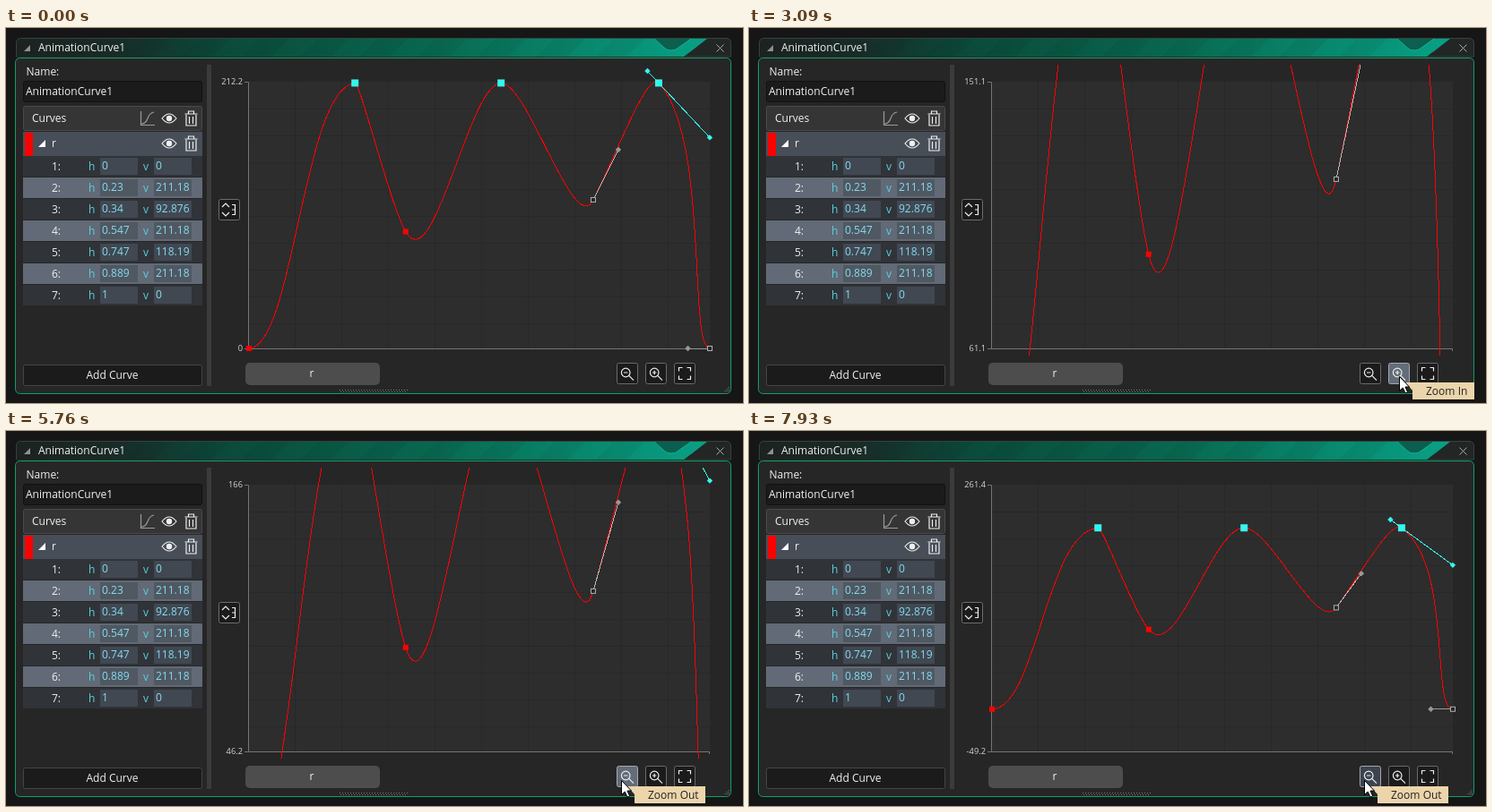
These frames come from a looping animation (822 px wide and 419 px high, 8000 ms). An HTML page:

```html
<!DOCTYPE html>
<html lang="en">
<head>
<meta charset="utf-8">
<title>Curve editor</title>
<style>
html, body { margin: 0; width: 100%; height: 100%; overflow: hidden; background: #161616; }
svg { display: block; width: 822px; height: 419px; font: 12px "Open Sans", "Noto Sans", sans-serif; }
text { fill: #f0f0f0; white-space: pre; }
.axis { font-size: 9.3px; fill: #d6d6d6; text-anchor: end; }
.mid { text-anchor: middle; }
.key { fill: #5ccfdc; }
.val { fill: #83dcf0; }
.icon { fill: none; stroke: #eee; stroke-width: 1.2; }
.tip text { fill: #222; }
</style>
</head>
<body>
<svg viewBox="0 0 822 419" xmlns="http://www.w3.org/2000/svg">
  <defs>
    <linearGradient id="bar">
      <stop offset="0" stop-color="#1c2221"/>
      <stop offset=".14" stop-color="#182b27"/>
      <stop offset=".3" stop-color="#0b4a3b"/>
      <stop offset=".6" stop-color="#08684f"/>
      <stop offset=".8" stop-color="#08856a"/>
      <stop offset="1" stop-color="#08a186"/>
    </linearGradient>
    <clipPath id="view"><rect x="264" y="41" width="526" height="325"/></clipPath>
  </defs>
  <g id="frame"></g>
  <g id="side"></g>
  <g id="plot"></g>
  <g clip-path="url(#view)" id="graph"></g>
  <text class="axis" id="top" x="264" y="63"></text>
  <text class="axis" id="bottom" x="264" y="361"></text>
  <g id="tools"></g>
  <g id="tips"></g>
  <path id="cursor" d="M.5 .5V16.5L4.2 13L7 19L9.6 17.8L7 12H11.5Z" fill="#fff" stroke="#000"/>
</svg>
<script>
const LOOP = 8000;
const $ = id => document.getElementById(id);
const rect = (x, y, w, h, fill, stroke = 'none', r = 0) =>
  `<rect x="${x}" y="${y}" width="${w}" height="${h}" rx="${r}" fill="${fill}" stroke="${stroke}"/>`;
const label = (x, y, str, cls = '') => `<text x="${x}" y="${y}" class="${cls}">${str}</text>`;
const path = (d, fill = 'none', stroke = 'none') => `<path d="${d}" fill="${fill}" stroke="${stroke}"/>`;
const icon = (x, y, d, stroke = '#eee') =>
  `<path class="icon" style="stroke:${stroke}" transform="translate(${x} ${y})" d="${d}"/>`;

// Each key: position, value, tangent slope on screen, handle reach to the left and right.
const keys = [
  [0, 0, 0, 0, 50],
  [.23, 211.18, -.1, 58, 6],
  [.34, 92.876, 1.7, 17, 32],
  [.547, 211.18, 0, 36, 30],
  [.747, 118.19, -2, 21.5, 28],
  [.889, 211.18, 1.07, 12.5, 57],
  [1, 0, 0, 24.5, 0]
];
const PLOT = { x: 271, y: 60, w: 514, h: 298 };
const HALF = 106.1;

function drawFrame() {
  let slants = '';
  for (let x = 130; x < 700; x += 66) slants += `M${x + 20} 12H${x + 54}L${x + 34} 32H${x}Z`;
  $('frame').innerHTML =
    path('M11.5 32V17Q11.5 11.5 17 11.5H803Q808.5 11.5 808.5 17V32Z', '#222625', '#35433f') +
    path('M12 32V17Q12 12 17 12H782L756 32Z', 'url(#bar)') + path(slants, 'rgba(0,25,18,.06)') +
    path('M723 12L734 22Q737 25 742 25Q747 25 750 22L764 12', '#0b5f4f', '#10b294') +
    path('M20 26H27V19Z', '#909090') +
    label(36, 26, 'AnimationCurve1') +
    path('M792.5 18.5L800.5 26.5M800.5 18.5L792.5 26.5', 'none', '#a9a9a9') +
    rect(10.5, 33.5, 798, 375, '#262626', '#0f9f68', 5) +
    `<path d="M372 404.5H448M373 406.5H448" stroke="#777" stroke-dasharray="1 2"/>` +
    `<path d="M806 401V407M804 403V407M802 405V407" stroke="#777" stroke-dasharray="1 1"/>`;
}

const EYE = 'M-8 0Q0-10 8 0Q0 10-8 0Z';
const TRASH = 'M-7-5H7M-3-5V-8H3V-5M-5.5-4V8H5.5V-4M-2-2V6M2-2V6';
const eyeAndTrash = y => icon(182, y, EYE) +
  `<circle cx="182" cy="${y}" r="3.2" fill="#eee"/>` + icon(206.5, y, TRASH);

function drawSide() {
  let out = label(22.5, 53, 'Name:') +
    rect(19.5, 59.5, 199, 23, '#1b1b1b', '#111', 2) + label(22, 75, 'AnimationCurve1') +
    rect(19.5, 87.5, 199, 27, '#353535', '#4a4a4a', 2) + label(29, 105, 'Curves') +
    icon(158, 101, 'M-7.5-8V7.5H8M-7 6Q-2 6 0 0T7-7', '#9a9a9a') + eyeAndTrash(101) +
    rect(19, 116, 200, 27, '#484e58') + rect(21, 117, 9, 26, '#f00') +
    path('M36 133H44V125Z', '#fff') + label(51, 133, 'r') + eyeAndTrash(129);
  keys.forEach(([h, v], i) => {
    const y = 143 + 24 * i, lit = i % 2, cell = lit ? '#505862' : '#414852';
    out += rect(19, y, 200, 23, lit ? '#616a76' : '#303338') +
      rect(105, y + 2, 42, 19, cell) + rect(165, y + 2, 42, 19, cell) +
      label(51, y + 16, i + 1 + ':') +
      label(92, y + 16, 'h', 'key') + label(107, y + 15, h, 'val') +
      label(153, y + 16, 'v', 'key') + label(167, y + 15, v, 'val');
  });
  out += rect(19.5, 376.5, 199, 23, '#1b1b1b', '#454545', 2) + label(118.5, 392, 'Add Curve', 'mid') +
    rect(224, 41, 5, 359, '#3b3b3b') +
    rect(237.5, 191.5, 23, 23, '#1b1b1b', '#6d6d6d', 2) +
    icon(249, 203, 'M-8-3L-4-7L0-3M-8 3L-4 7L0 3M3-5.5H6.5V5.5H3M3 0H6.5');
  $('side').innerHTML = out;
}

function drawPlot() {
  const { x, y, w, h } = PLOT;
  let lines = '';
  for (let i = 1; i < 10; i++) {
    lines += `M${x - .5 + 52 * i} ${y}v${h}M${x} ${y + .5 + 30 * i}h${w}`;
  }
  $('plot').innerHTML = rect(x, y, w, h, '#2d2d2d') + path(lines, 'none', '#282828') +
    path('M266 60.5H270.5V358.5H785M266 358.5H270.5M784.5 358V361', 'none', '#757575') +
    rect(267, 374, 150, 25, '#4d4d4d', 'none', 5) + label(341, 390, 'r', 'mid');
}

function drawGraph(scale) {
  const toY = v => PLOT.y + PLOT.h / 2 - (v - HALF) / HALF * PLOT.h / 2 * scale;
  const pts = keys.map(([h, v, slope, left, right]) => {
    const x = PLOT.x + h * PLOT.w, y = toY(v);
    const handle = dx => [x + dx, y + slope * dx * scale];
    return { at: [x, y], left: handle(-left), right: handle(right) };
  });
  const line = (a, b, color) =>
    `<path d="M${a}L${b}" stroke="${color}" shape-rendering="crispEdges"/>`;
  const square = (p, r, fill, stroke) =>
    rect(p.at[0] - r, p.at[1] - r, 2 * r, 2 * r, fill, stroke);
  const diamond = ([x, y], color) =>
    path(`M${x - 3.2} ${y}L${x} ${y - 3.2}L${x + 3.2} ${y}L${x} ${y + 3.2}Z`, color);

  const segments = pts.slice(1).map((p, i) => `C${pts[i].right} ${p.left} ${p.at}`).join('');
  const [start, second, dip, fourth, low, peak, end] = pts;
  const red = '#f00', cyan = '#35f5ec', grey = '#999';
  $('graph').innerHTML =
    `<path d="M${start.at}${segments}" fill="none" stroke="${red}" shape-rendering="crispEdges"/>` +
    line(low.at, low.right, '#b8b8b8') + line(peak.left, peak.right, cyan) + line(end.left, end.at, grey) +
    diamond(low.right, grey) + diamond(end.left, grey) +
    diamond(peak.left, cyan) + diamond(peak.right, cyan) +
    [start, dip].map(p => square(p, 3, red)).join('') +
    [second, fourth, peak].map(p => square(p, 4, cyan)).join('') +
    [low, end].map(p => square(p, 2.5, '#262626', '#b0b0b0')).join('');
}

function drawTools() {
  const box = (id, x) => `<rect id="${id}" x="${x + .5}" y="374.5" width="23" height="23" rx="2"/>`;
  const lens = 'M4 0A4.8 4.8 0 1 1-5.6 0A4.8 4.8 0 1 1 4 0M2.8 3.4L8 8.6M-3 0H1.4';
  $('tools').innerHTML = box('out', 681) + box('in', 713) + box('fit', 745) +
    icon(692, 385, lens) + icon(724, 385, lens + 'M-.8-2.2V2.2') +
    icon(757, 386, 'M-6.5-2.5V-6.5H-2.5M2.5-6.5H6.5V-2.5M6.5 2.5V6.5H2.5M-2.5 6.5H-6.5V2.5');
  const tip = (id, x, y, w, str) => `<g class="tip" id="${id}">` +
    path(`M${x - 8} ${y}H${x + w}V${y + 19}H${x}V${y + 9}Z`, '#ecd5ab') + label(x + 15, y + 14, str) + '</g>';
  $('tips').innerHTML = tip('tipIn', 740, 396, 69, 'Zoom In') + tip('tipOut', 701, 397, 79, 'Zoom Out');
}

// A run of regular clicks: the button goes down, and its release zooms one step.
const HOLD = .58;
const zoomIn = { start: 1660, period: 176, clicks: 12 };
const zoomOut = { start: 4605, period: 215, clicks: 16 };

function clicksAt({ start, period, clicks }, t) {
  const beat = (t - start) / period;
  const done = Math.max(0, Math.min(clicks, Math.floor(beat) + 1));
  return { done, pressed: beat >= done - HOLD };
}

const clamp = p => Math.max(0, Math.min(1, p));
const LEAVE = 3970;

function cursorAt(t) {
  if (t < 500) return [725, 430];
  if (t < LEAVE) return [725, Math.round(389 + 25 * (1 - clamp((t - 500) / 720)) ** 2)];
  return [Math.round(686 + 13 * (1 - clamp((t - LEAVE) / 180)) ** 2), t < LEAVE + 90 ? 389 : 390];
}

function paintButton(id, hover, pressed) {
  $(id).setAttribute('fill', !hover ? '#1b1b1b' : pressed ? '#3d444f' : '#636c78');
  $(id).setAttribute('stroke', hover ? '#a3a9b3' : '#6a6a6a');
}

const show = (id, on) => $(id).setAttribute('visibility', on ? 'visible' : 'hidden');
let shown = null;

function render(t) {
  const closer = clicksAt(zoomIn, t), wider = clicksAt(zoomOut, t);
  const level = closer.done - wider.done;
  if (level !== shown) {
    shown = level;
    const scale = 1.1 ** level;
    drawGraph(scale);
    $('top').textContent = +(HALF + HALF / scale).toFixed(1);
    $('bottom').textContent = +(HALF - HALF / scale).toFixed(1);
  }
  paintButton('in', t >= 770 && t < LEAVE, closer.pressed);
  paintButton('out', t >= LEAVE + 90, wider.pressed);
  show('tipIn', t >= 1590 && t < LEAVE + 90);
  show('tipOut', t >= 4520);
  $('cursor').setAttribute('transform', `translate(${cursorAt(t)})`);
}

drawFrame();
drawSide();
drawPlot();
drawTools();
paintButton('fit', false, false);
render(0);

const start = performance.now();
function tick() {
  render((performance.now() - start) % LOOP);
  requestAnimationFrame(tick);
}
requestAnimationFrame(tick);
</script>
</body>
</html>
```
